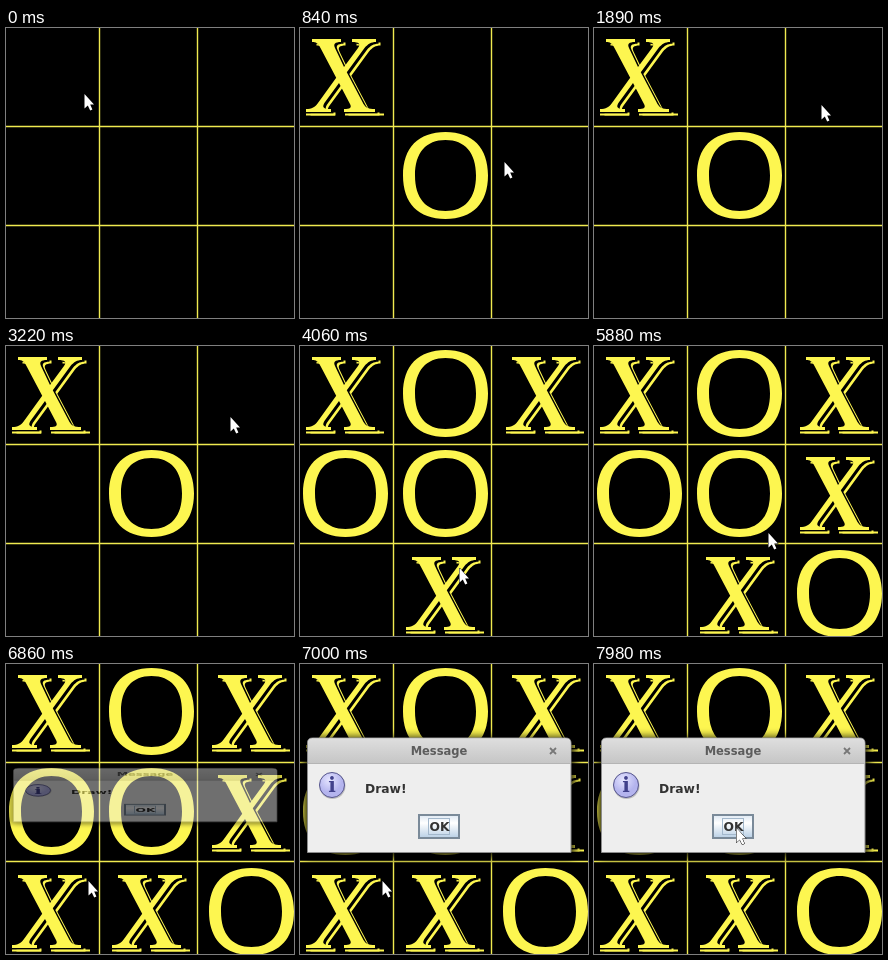
Write an HTML page that moves like this. It is 288 px wide and 290 px high and loops after 8 s.

```html
<!DOCTYPE html>
<html lang="en">
<head>
<meta charset="utf-8">
<title>Tic-tac-toe</title>
<style>
html, body { margin: 0; width: 100%; height: 100%; overflow: hidden; background: #000; }
svg { display: block; width: 288px; height: 290px; }
text { font: bold 12.3px "DejaVu Sans", sans-serif; fill: #333; }
.title { font-size: 11.5px; fill: #5c5c5c; }
.info { font: bold 20px "DejaVu Serif", serif; fill: #41418c; }
.mid { text-anchor: middle; }
</style>
</head>
<body>
<svg viewBox="0 0 288 290">
  <defs>
    <path id="body" d="M12 11H41V14C35 14 33 16 35 20L44 39L58 20C61 16 59 14 52 14V11H76V14C71 14 68 16 64.500 20L46.800 44.300L63.500 76C66 80 68 81 75 81V84H44V81C50 81 52 80 50 76L39 55L24.400 75C22 79 23 81 31 81V84H6V81C12 81 15 79 18 75L36.200 49.800L20.500 20C18 15 16 14 12 14Z"/>
    <g id="X">
      <use href="#body" x="4.500" y="3.500" fill="#fdf650"/>
      <use href="#body" x="2.500" y="1.700" fill="#000"/>
      <use href="#body" fill="#fdf650"/>
      <path d="M6 86.500H35M45 86.500H84" stroke="#fdf650" stroke-width="1.800"/>
    </g>
    <path id="O" fill="#fdf650" fill-rule="evenodd"/>
    <linearGradient id="bar" x2="0" y2="1">
      <stop stop-color="#dedede"/><stop offset="1" stop-color="#c6c6c6"/>
    </linearGradient>
    <linearGradient id="btn" x2="0" y2="1">
      <stop stop-color="#dde8f3"/><stop offset=".35" stop-color="#fff"/><stop offset="1" stop-color="#b8cfe5"/>
    </linearGradient>
    <radialGradient id="ball" cx=".4" cy=".3">
      <stop stop-color="#e6e6ff"/><stop offset="1" stop-color="#b4b4ee"/>
    </radialGradient>
    <filter id="soft" x="-10%" y="-20%" width="120%" height="140%"><feGaussianBlur stdDeviation="4"/></filter>
  </defs>
  <path d="M93.500 0V290M191.500 0V290M0 98.500H288M0 197.500H288" stroke="#f0ea50" stroke-width="1.400"/>
  <g id="marks"></g>
  <g id="dialog">
    <rect x="4" y="73" width="271" height="121" rx="6" filter="url(#soft)" opacity=".85"/>
    <path d="M7.500 188.500V79q0-5 5-5H266q5 0 5 5V188.500Z" fill="#eee" stroke="#8c8c8c"/>
    <path d="M8 99V79q0-4.500 4.500-4.500H266q4.500 0 4.500 4.500V99Z" fill="url(#bar)"/>
    <path d="M8 99.500H270.500" stroke="#b4b4b4"/>
    <text class="title mid" x="139" y="91">Message</text>
    <path d="M250 84l6 6m0-6l-6 6" stroke="#777" stroke-width="1.800"/>
    <circle cx="32.500" cy="122" r="13" fill="#000" opacity=".2"/>
    <circle cx="32" cy="121" r="12.500" fill="url(#ball)" stroke="#55558c"/>
    <text class="info mid" x="32" y="128">i</text>
    <text x="65" y="129">Draw!</text>
    <rect x="119" y="151" width="40" height="23" fill="url(#btn)" stroke="#7a8a99" stroke-width="2"/>
    <rect x="128.500" y="154.500" width="21" height="16" fill="none" stroke="#a3b8cc"/>
    <text class="mid" x="139.500" y="167">OK</text>
  </g>
  <path id="cursor" d="M.5 1V15.500L3.800 12.500L6.200 17.500L8.400 16.600L6.200 11.500H10Z" fill="#fff" stroke="#000" paint-order="stroke"/>
</svg>
<script>
const LOOP = 8000, STEP = 70, OPEN = 6790;
const $ = id => document.getElementById(id);

// click time, then the cells filled: player's X, reply O
const turns = [[420, 0, 4], [3290, 2, 1], [3920, 7, 3], [5390, 5, 8], [OPEN, 6]];

// pointer glides: start, end, x, y; it rests in between
const home = { x: 78, y: 65 };
const glides = [
  [350, 840, 204, 133], [910, 1610, 227, 77], [1680, 3220, 224, 70],
  [3430, 4060, 159, 221], [4060, 4410, 215, 210], [4690, 5250, 231, 168],
  [5600, 6440, 82, 216], [7000, 7560, 148, 183], [7560, 7980, 142, 163]
];

const clamp = v => Math.min(1, Math.max(0, v));
const easeOut = p => 1 - (1 - p) ** 1.2;

function pointer(t) {
  let { x, y } = home;
  for (const [from, to, tx, ty] of glides) {
    const p = easeOut(clamp((t - from) / (to - from)));
    x += (tx - x) * p;
    y += (ty - y) * p;
  }
  return [Math.round(x), Math.round(y)];
}

// a squarish oval around the middle of a cell
function oval(rx, ry) {
  const cx = 45.5, cy = 47.5, k = .64;
  const at = (x, y) => `${cx + x * rx} ${cy + y * ry} `;
  let d = 'M' + at(1, 0);
  for (let i = 0, x = 1, y = 0; i < 4; i++) {
    const [nx, ny] = [-y, x];
    d += 'C' + at(x + k * nx, y + k * ny) + at(nx + k * x, ny + k * y) + at(nx, ny);
    [x, y] = [nx, ny];
  }
  return d + 'Z';
}
$('O').setAttribute('d', oval(42.5, 43.5) + oval(30.5, 35.5));

const marks = turns.flatMap(([at, ...cells]) => cells.map((cell, i) => {
  const el = document.createElementNS('http://www.w3.org/2000/svg', 'use');
  el.setAttribute('href', '#' + 'XO'[i]);
  el.setAttribute('x', cell % 3 * 100);
  el.setAttribute('y', Math.floor(cell / 3) * 100);
  $('marks').append(el);
  return { at, el };
}));

const show = (el, on) => el.setAttribute('visibility', on ? 'visible' : 'hidden');

function draw(now) {
  const t = Math.floor(now % LOOP / STEP) * STEP;
  for (const { at, el } of marks) show(el, t >= at);

  // the dialog unfolds from its middle line while fading in
  const p = clamp((t - OPEN) / 150);
  show($('dialog'), p > 0);
  $('dialog').setAttribute('opacity', p);
  $('dialog').setAttribute('transform', `translate(0 ${131 * (1 - p)}) scale(1 ${p || 1})`);

  $('cursor').setAttribute('transform', `translate(${pointer(t)})`);
}

const start = performance.now();
function tick() {
  draw(performance.now() - start);
  requestAnimationFrame(tick);
}
tick();
</script>
</body>
</html>
```
